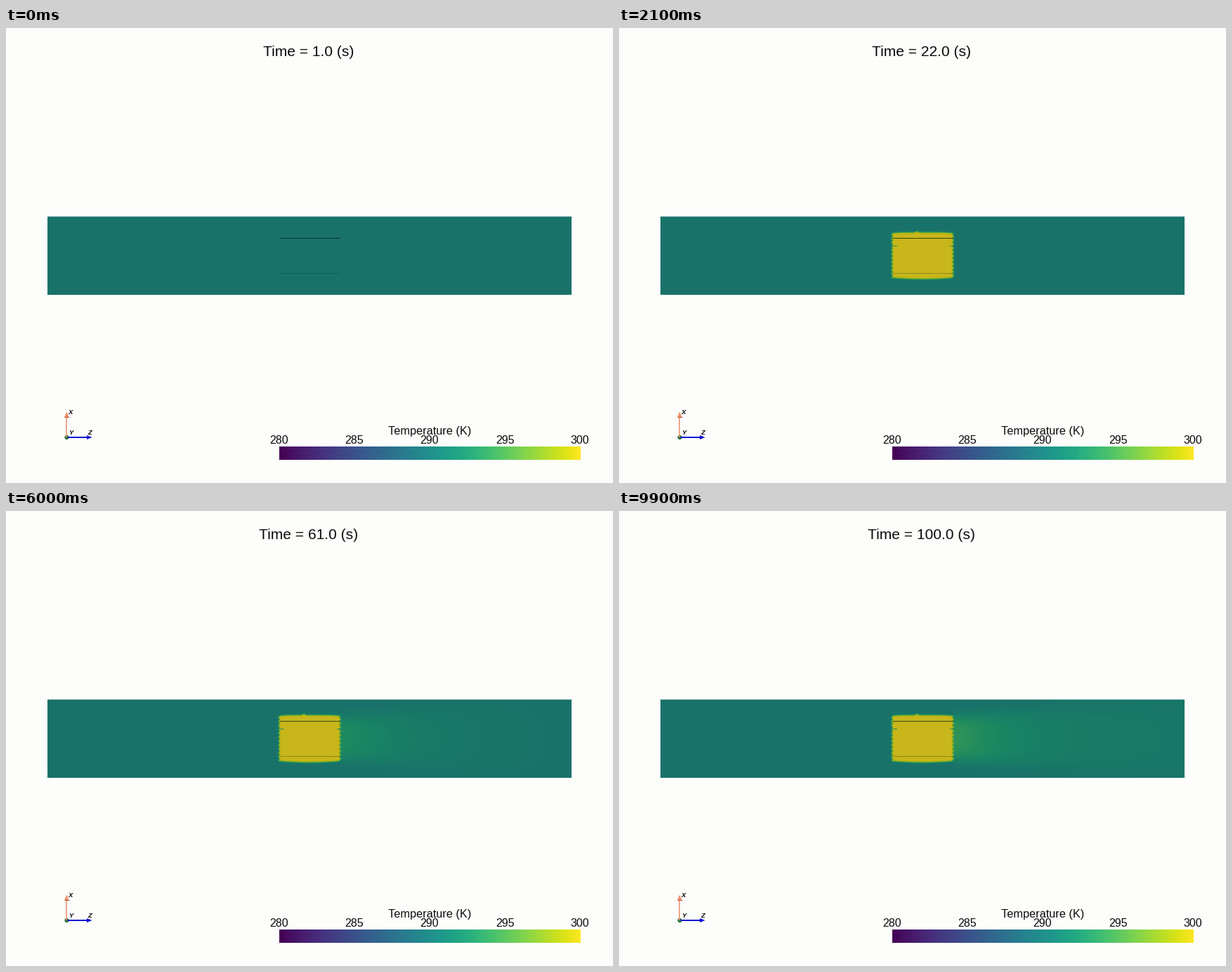
A matplotlib script for the animation above (10000 ms loop, 864 by 648 pixels).

```python
import numpy as np
import matplotlib.pyplot as plt
from matplotlib.animation import FuncAnimation
from matplotlib.colors import to_rgb
from matplotlib.patches import Circle, Polygon

W, H, DPI = 864, 648, 100
FRAMES, INTERVAL = 100, 100
PX = 72 / DPI                      # points per pixel
T_MIN, T_MAX, T_AMB = 280, 300, 290
LIGHT = np.array([0.79, 0.79, 0.75])
VIRIDIS = plt.get_cmap("viridis")
PAPER = "#fdfdfc"

plt.rcParams["font.family"] = "Liberation Sans"
fig = plt.figure(figsize=(W / DPI, H / DPI), dpi=DPI, facecolor=PAPER)
ax = fig.add_axes([0, 0, 1, 1])
ax.axis("off")


def label(x, y, s, size, **kw):
    kw = {"ha": "center", "va": "baseline", "color": "#0a0a0a", **kw}
    return ax.text(x, y, s, fontsize=size * PX, **kw)


def line(xs, ys, color, width=1, **kw):
    ax.plot(xs, ys, color=color, lw=width * PX, solid_capstyle="butt", **kw)


# Channel grid at pixel centres
X0, X1, Y0, Y1 = 59, 805, 268, 380
x, y = np.meshgrid(np.arange(X0, X1) + 0.5, np.arange(Y0, Y1) + 0.5)


def step(d, soft=0.65):
    return 1 / (1 + np.exp(-np.clip(d / soft, -40, 40)))


def heater_mask(grow):
    """Hot block with toothed sides and slightly bowed top and bottom."""
    teeth = 0.6 * np.cos(2 * np.pi * y / 5.6)
    bow = ((x - 432) / 44) ** 2
    bump = 1.5 * np.exp(-((x - 424) / 2.5) ** 2)
    top = 291.4 + 1.2 * bow ** 3 - bump - grow
    bottom = 357.3 - 2.0 * bow + grow
    mask = step(x - 388.6 - teeth) * step(475.7 + teeth - x)
    mask *= step(y - top) * step(bottom - y)
    notch = (np.abs(y - 310.3) < 0.6) & ((x < 396) | (x > 471))
    return np.where(notch, 0.3 * mask, mask)


def wake(t):
    """Warm plume carried downstream of the block."""
    u = np.maximum(x - 476, 0)
    v = np.abs(y - 323.5) / (32 + 0.09 * u)
    gain = 4.6 * (1 - np.exp(-max(t - 20, 0) / 50))
    along = 0.6 * np.exp(-(u / 72) ** 1.4) + 0.4 * np.exp(-u / 480)
    front = step(6 * max(t - 25, 0) + 30 - u, 45)
    return gain * along * front * np.exp(-v ** 4) * step(x - 476)


def heat(t):
    """Block temperature, slightly hotter in the core while warming up."""
    core = np.exp(-((x - 432) / 30) ** 2 - ((y - 324) / 22) ** 2)
    return np.minimum(T_AMB + (0.69 + 0.06 * core) * (t - 1), T_MAX)


def channel(t):
    temp = T_AMB + wake(t)
    mask = heater_mask(0.8 * min(t / 50, 1))
    temp += mask * np.maximum(heat(t) - temp, 0)
    rgb = VIRIDIS((temp - T_MIN) / (T_MAX - T_MIN))[..., :3] * LIGHT
    rgb[0] = (rgb[0] + to_rgb(PAPER)) / 2      # edge falls mid-pixel
    return rgb


body = ax.imshow(channel(1), extent=(X0, X1, Y1, Y0),
                 interpolation="nearest", aspect="auto")
line([389, 475], [299, 299], "#081c1c", alpha=0.75)
line([389, 475], [349, 349], "#102c30", alpha=0.32)

# Colour bar
ax.imshow(np.linspace(0, 1, 256)[None], cmap=VIRIDIS, aspect="auto",
          extent=(389, 818, 615, 596), interpolation="nearest")
for i in range(5):
    label(389 + 107 * i, 591.5, str(T_MIN + 5 * i), 16)
label(603.3, 579, "Temperature (K)", 16.3)

# Orientation axes
ORANGE, BLUE = "#f0926c", "#0c0cd8"
line([86, 86], [583, 553], ORANGE, 1.6)
ax.add_patch(Polygon([(83, 554), (89.5, 554), (86.3, 546.5)], fc=ORANGE, lw=0))
line([83, 89.5], [553.5, 553.5], "#b0503c", 1)
line([88, 116], [583, 583], BLUE, 2)
ax.add_patch(Polygon([(115, 580), (115, 586), (122.5, 583)], fc=BLUE, lw=0))
ax.add_patch(Circle((86.5, 583), 3.1, fc="#23703c", lw=0))
for name, lx, ly in (("X", 92, 550), ("Y", 92, 579), ("Z", 119.5, 579)):
    label(lx, ly, name, 9.5, weight="bold", style="italic")

title = label(430.5, 40.5, "", 21)
ax.set_xlim(0, W)
ax.set_ylim(H, 0)


def draw(k):
    t = k + 1
    body.set_data(channel(t))
    title.set_text(f"Time = {t:.1f} (s)")
    return body, title


anim = FuncAnimation(fig, draw, frames=FRAMES, interval=INTERVAL,
                     repeat=True, repeat_delay=0)
plt.show()
```
